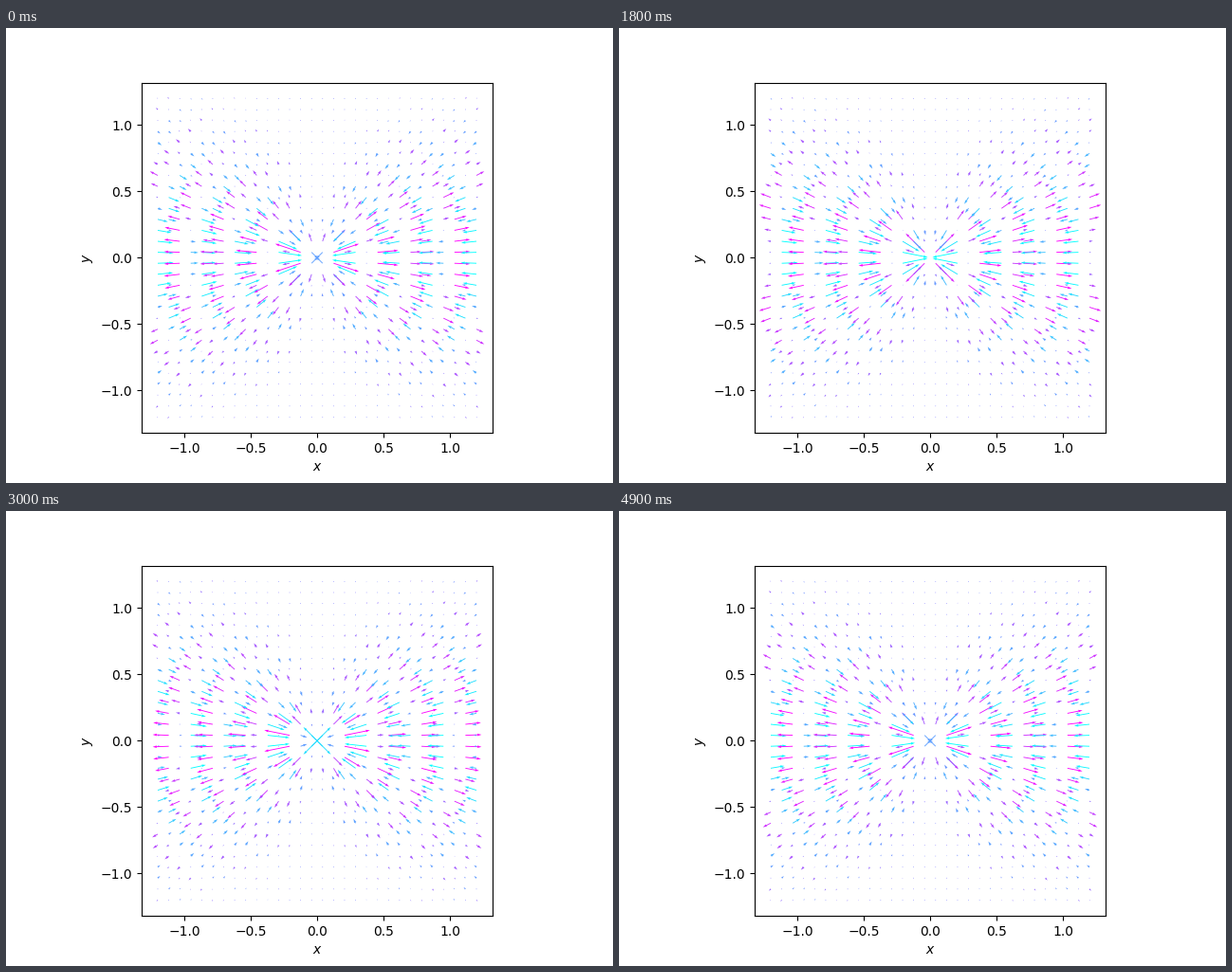
Recreate the animation shown at these times as a matplotlib script. Size 640 by 480 pixels, loop 5000 ms.

```python
import numpy as np
import matplotlib.pyplot as plt
from matplotlib.animation import FuncAnimation

FRAMES = 50
INTERVAL = 100
WAVELENGTH = 0.3
CYCLES = 2

axis = np.linspace(-1.2, 1.2, 30)
x, y = np.meshgrid(axis, axis)
r = np.hypot(x, y)

# Two-lobed beam along x; arrows get longer towards the centre.
beam = np.abs(x) / r * np.exp(-1.1 * y**2)
reach = beam * r**-0.3


def wave(frame):
    """Outgoing radial wave, positive where the arrows point outwards."""
    turn = CYCLES * frame / (FRAMES - 1)
    return -np.cos(2 * np.pi * (r / WAVELENGTH - turn))


def field(frame):
    w = wave(frame)
    return w * reach * x / r, w * reach * y / r, w * beam


fig, ax = plt.subplots(figsize=(6.4, 4.8), dpi=100)
ax.set_aspect("equal")
ax.set_xlim(-1.32, 1.32)
ax.set_ylim(-1.32, 1.32)
ax.set_xticks([-1, -0.5, 0, 0.5, 1])
ax.set_yticks([-1, -0.5, 0, 0.5, 1])
ax.set_xlabel("$x$")
ax.set_ylabel("$y$")

arrows = ax.quiver(x, y, *field(0), cmap="cool", scale=21, width=0.0024)
arrows.set_clim(-0.95, 0.95)


def update(frame):
    arrows.set_UVC(*field(frame))
    return (arrows,)


anim = FuncAnimation(fig, update, frames=FRAMES, interval=INTERVAL,
                     repeat=True, repeat_delay=0)
plt.show()
```
